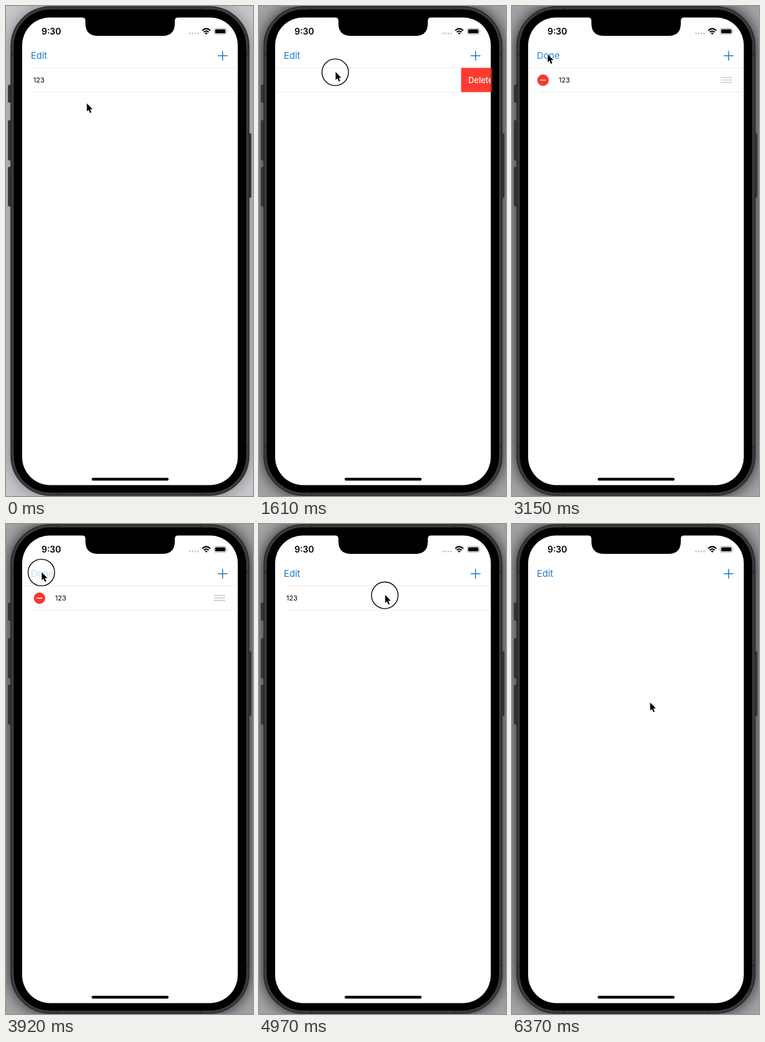
These frames come from a looping animation (398x788 px, 6440 ms). An HTML page:

```html
<!DOCTYPE html>
<html lang="en">
<head>
<meta charset="utf-8">
<title>Swipe to delete</title>
<style>
  html, body { margin: 0; width: 100%; height: 100%; overflow: hidden; background: #777; }
  svg { display: block; width: 398px; height: 788px; }
  text { font-family: Inter, Roboto, sans-serif; }
</style>
</head>
<body>
<svg viewBox="0 0 398 788">
  <defs>
    <filter id="blur" x="-20%" y="-20%" width="140%" height="140%"><feGaussianBlur stdDeviation="13"/></filter>
    <clipPath id="screenClip"><rect x="26" y="18.4" width="347.5" height="752" rx="45"/></clipPath>
    <clipPath id="rowClip"><rect id="rowBox" x="26" y="99.5" width="347.5" height="39"/></clipPath>
  </defs>

  <!-- Backdrop and phone body -->
  <rect width="398" height="788" fill="#c8c8cc"/>
  <rect id="dim" width="398" height="788"/>
  <rect id="shadow" x="8" y="1" width="383.5" height="786" rx="64" filter="url(#blur)"/>
  <g fill="#333336" stroke="#252527" stroke-width=".6">
    <rect x="3.5" y="127" width="6" height="28" rx="1.5"/>
    <rect x="3.5" y="184" width="6" height="64" rx="1.5"/>
    <rect x="3.5" y="259" width="6" height="63" rx="1.5"/>
    <rect x="390" y="205" width="5" height="103" rx="1.5"/>
  </g>
  <rect x="8" y="1" width="383.5" height="786" rx="64" fill="#3b3b3d" stroke="#29292b" stroke-width="1.6"/>
  <path d="M8 78h5M386 78h5M8 710h5M386 710h5M84 1v5M314 1v5M84 782v5M314 782v5" stroke="#303032" stroke-width="4"/>
  <rect x="12.5" y="5.5" width="374.5" height="777" rx="59"/>
  <rect x="26" y="18.4" width="347.5" height="752" rx="45" fill="#fff"/>
  <path d="M122 18q6 0 6 6v4q0 20 20 20h104q20 0 20-20v-4q0-6 6-6z"/>
  <rect x="138" y="758.8" width="124" height="4.4" rx="2.2"/>

  <!-- Status bar -->
  <text x="57.2" y="45.5" font-size="14" font-weight="600">9:30</text>
  <path d="M296.5 44h14" stroke="#c8c8ca" stroke-width="3" stroke-linecap="round" stroke-dasharray="0 4.3"/>
  <path d="M316.2 39.4q6.5-6 13 0M318.7 42q4-3.6 8 0" fill="none" stroke="#000" stroke-width="2"/>
  <path d="M320.4 43.6q2.3-1.8 4.6 0l-2.3 2.4z"/>
  <rect x="335.5" y="36" width="19.5" height="9.6" rx="2.8" fill="none" stroke="#a5a5a8"/>
  <rect x="337" y="37.5" width="16.5" height="6.6" rx="1.5"/>
  <path d="M356.2 39.3q1.6 1.5 0 3z" fill="#a5a5a8"/>

  <!-- Navigation bar -->
  <text id="label" x="40" y="85.2" font-size="14.8" fill="#167acb">Edit</text>
  <path d="M341.2 80h15.6M349 72.2v15.6" stroke="#167acb" stroke-width="1.5"/>

  <!-- List row -->
  <g clip-path="url(#screenClip)">
    <g clip-path="url(#rowClip)">
      <text id="item" y="123" font-size="11">123</text>
      <g id="minus">
        <circle cx="54" cy="119.2" r="9.2" fill="#f8392f"/>
        <path d="M49.5 119.2h9" stroke="#fff" stroke-width="1.5"/>
      </g>
      <path id="handle" d="M335 115h18M335 119h18M335 123h18" stroke="#c6c6c9" stroke-width="1.3"/>
    </g>
    <path id="lines" stroke="#ebebed"/>
  </g>
  <g id="action">
    <rect id="red" y="99.5" fill="#ff3b30"/>
    <rect id="bleed" x="373.5" y="99.5" width="2.5" fill="#7d1d18"/>
    <g clip-path="url(#rowClip)">
      <text id="delete" y="123.7" font-size="13" font-weight="500" fill="#fff">Delete</text>
    </g>
  </g>

  <!-- Pointer -->
  <g id="pointer">
    <circle id="ring" cx="-.3" cy="1.2" r="21.4" fill="none" stroke="#000" stroke-width="1.4"/>
    <path d="M.3 .6v13l2.9-2.7 2.2 5.2 2.2-.9-2.2-5.1h4z" stroke="#fff" stroke-width="1.2"
          stroke-linejoin="round" paint-order="stroke"/>
  </g>
</svg>
<script>
const LOOP = 6440, STEP = 70;
const LEFT = 26, RIGHT = 373.5, TOP = 99.5, ROW = 39;
const OPEN = 60, PARTIAL = 34;

// The pointer rests between moves; the button is held while dragging.
const start = { x: 130, y: 156 };
const reach = { from: 70, to: 490, x: 140.5, y: 112 };
const dragOpen = { from: 560, to: 1100, x: reach.x - OPEN, y: 107, held: true };
const regrip = { from: 1120, to: 1330, x: 111, y: 105.5 };
const dragBack = { from: 1400, to: 1920, x: regrip.x + PARTIAL, y: 105, held: true };
const toEdit = { from: 2310, to: 2630, x: 57.3, y: 76.8 };
const toRow = { from: 4200, to: 4830, x: 203, y: 113.5 };
const dragAgain = { from: 4970, to: 5320, x: toRow.x - OPEN, y: 116, held: true };
const toDelete = { from: 5390, to: 5740, x: 343, y: 116 };
const leave = { from: 5950, to: 6370, x: 222.3, y: 286.5 };
const moves = [reach, dragOpen, regrip, dragBack, toEdit, toRow, dragAgain, toDelete, leave];

const TAP = 140, FADE = 350;
const editTap = 2730, doneTap = 3920, deleteTap = 5810;

const $ = id => document.getElementById(id);
const set = (id, attrs) => {
  for (const name in attrs) $(id).setAttribute(name, attrs[name]);
};
const mix = (a, b, p) => a + (b - a) * p;
const ease = (t, from, to) => {
  const p = Math.min(1, Math.max(0, (t - from) / (to - from)));
  return p * p * (3 - 2 * p);
};
const progress = (t, move) => ease(t, move.from, move.to);
const within = (t, from, to) => t >= from && t < to;

function pointerAt(t) {
  return moves.reduce((at, move) => {
    const p = progress(t, move);
    return { x: mix(at.x, move.x, p), y: mix(at.y, move.y, p) };
  }, start);
}

function isPressed(t) {
  return moves.some(m => m.held && within(t, m.from - STEP, m.to))
    || [editTap, doneTap, deleteTap].some(tap => within(t, tap, tap + TAP));
}

function swipeAt(t) {
  return OPEN * (progress(t, dragOpen) + progress(t, dragAgain))
    - PARTIAL * progress(t, dragBack)
    - (OPEN - PARTIAL) * ease(t, dragBack.to, dragBack.to + 180);
}

const labelDim = (t, tap) => ease(t, tap - STEP, tap) - ease(t, tap + TAP, tap + TAP + FADE);

function render(t) {
  const { x, y } = pointerAt(t);
  set('pointer', { transform: `translate(${x} ${y})` });
  set('ring', { opacity: +isPressed(t) });

  const focus = ease(t, 420, 630);
  set('dim', { opacity: .18 * focus });
  set('shadow', { opacity: mix(.4, .85, focus) });

  $('label').textContent = within(t, editTap + TAP, doneTap + TAP) ? 'Done' : 'Edit';
  set('label', { opacity: 1 - .75 * (labelDim(t, editTap) + labelDim(t, doneTap)) });

  const editing = ease(t, editTap + TAP, editTap + TAP + FADE) - ease(t, doneTap + TAP, doneTap + TAP + FADE);
  const removed = ease(t, deleteTap + TAP, deleteTap + TAP + FADE);
  const swipe = swipeAt(t);
  const width = mix(swipe, RIGHT - LEFT, Math.min(1, removed * 1.6));
  const height = ROW * (1 - removed);
  const inset = swipe > 0 ? LEFT : 44;

  set('rowBox', { height });
  set('item', { x: 44 + 35 * editing - (swipe > 0 ? width : 0) });
  set('minus', { transform: `translate(${-38 * (1 - editing)} 0)` });
  set('handle', { opacity: editing, transform: `translate(${12 * (1 - editing)} 0)` });
  set('lines', {
    d: `M${editing > 0 ? LEFT : inset} ${TOP}H${RIGHT}M${inset} ${TOP + height - .5}H${RIGHT}`,
    opacity: +(removed < 1)
  });
  set('action', { opacity: +(swipe > 0 && removed < 1) });
  set('red', { x: RIGHT - width, width, height });
  set('bleed', { height });
  set('delete', { x: RIGHT - width + 11.5 });
}

function frame(now) {
  render(Math.floor((now % LOOP) / STEP) * STEP);
  requestAnimationFrame(frame);
}
requestAnimationFrame(frame);
</script>
</body>
</html>
```
